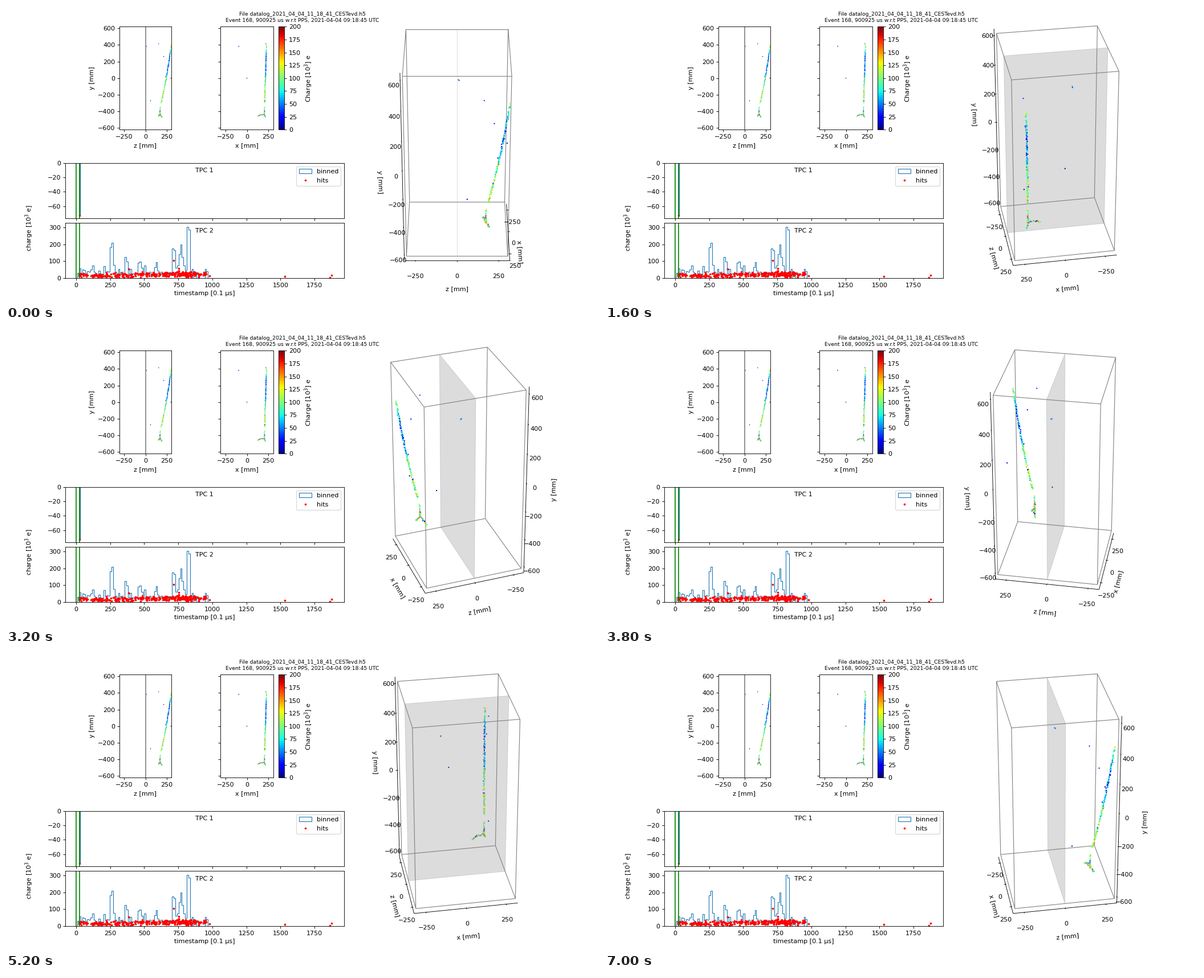
Write a matplotlib script that moves like this. It is 1040 px wide and 520 px high and loops after 7200 ms.

```python
import itertools
import math

import matplotlib.pyplot as plt
import numpy as np
from matplotlib.animation import FuncAnimation
from matplotlib.cm import ScalarMappable
from matplotlib.collections import LineCollection
from matplotlib.colors import Normalize
from matplotlib.patches import Polygon

WIDTH, HEIGHT, DPI = 1040, 520, 80
FRAMES, INTERVAL = 36, 200
rng = np.random.default_rng(168)

# Detector limits in plotting order: x, z (drift), y (vertical)
LIMITS = np.array([310, 304, 620])
TICKS = [range(-250, 251, 250), range(-250, 251, 250), range(-600, 601, 200)]
TITLES = ["x [mm]", "z [mm]", "y [mm]"]

# Camera: the 3D view fills a square between 5 % and 90 % of the height
HALF = np.array([1, 1, 2]) * 1.8294640721620434 / math.sqrt(6) / 2
ELEV, DIST = math.radians(30), 10
SCALE = 0.85 * HEIGHT / 0.185
CENTER_X, CENTER_Y = 791.1, 0.9 * HEIGHT - 0.095 * SCALE

# Axis decoration, in units of the half box
EDGE = 25 / 24
POINT = 0.01004
LABEL_RADIUS = EDGE + 11.5 * POINT
TITLE_RADIUS = [EDGE + pad * POINT for pad in (25, 25, 41)]
CROSS = (1, 0, 0)  # direction of the tick marks on each axis

fig = plt.figure(figsize=(WIDTH / DPI, HEIGHT / DPI), dpi=DPI, facecolor="white")


def add_axes(left, top, width, height):
    return fig.add_axes([left / WIDTH, 1 - (top + height) / HEIGHT,
                         width / WIDTH, height / HEIGHT])


def label_at(x, y, text, **style):
    fig.text(x / WIDTH, 1 - y / HEIGHT, text, ha="center", va="center", **style)


# ---------------------------------------------------------------- data
def strand(count, curve, jitter=2.2):
    """Hits scattered around a curve t -> (x, z, y) with t from 0 to 1."""
    t = np.sort(rng.random(count))
    points = np.column_stack([np.broadcast_to(c, t.shape) for c in curve(t)])
    return points + rng.normal(0, jitter, points.shape)


def track_curve(t):
    y = 400 - 695 * t
    return 217 + 0.03 * y, 243 + 0.175 * y - 6.7e-5 * y ** 2, y


def make_hits():
    strands = [
        strand(230, track_curve),
        strand(28, lambda t: (204, 172, -345 - 95 * t)),
        strand(20, lambda t: (204 + 12 * t, 172 + 22 * t, -440 - 27 * t)),
        strand(26, lambda t: (203 - 88 * t, 172 - 19 * t, -438 - 32 * t ** 3)),
    ]
    strays = [(-97, 8, 385), (-97, 12, 381), (222, 155, 414), (222, 214, 261),
              (215, 238, 22), (210, 60, -272), (0, 299, 0)]
    points = np.vstack(strands)
    y = points[:, 2]
    mean = 100 - 57 * np.exp(-((y - 175) / 150) ** 4)
    value = rng.normal(mean, np.where(y < -340, 40, 25))
    points = np.vstack([points, strays])
    points[:, 1] = np.minimum(points[:, 1], 303)
    return points, np.r_[np.clip(value, 12, 190), np.linspace(50, 8, len(strays))]


hits, charge = make_hits()
jet = dict(cmap="jet", norm=Normalize(0, 200))

# ---------------------------------------------------------------- projections
fig.suptitle("File datalog_2021_04_04_11_18_41_CESTevd.h5\n"
             "Event 168, 900925 us w.r.t PPS, 2021-04-04 09:18:45 UTC",
             fontsize="small")

SIDE_TOP, SIDE_HEIGHT = 36.2, 181.2


def draw_side(left, width, column):
    ax = add_axes(left, SIDE_TOP, width, SIDE_HEIGHT)
    ax.scatter(hits[:, column], hits[:, 2], s=1.9, c=charge, linewidths=0, **jet)
    ax.set(xlim=(-LIMITS[column], LIMITS[column]), ylim=(-LIMITS[2], LIMITS[2]),
           xticks=TICKS[column], yticks=TICKS[2], xlabel=TITLES[column])
    return ax


zy = draw_side(199, 91, 1)
zy.axvline(0, color="gray")
zy.set_ylabel(TITLES[2])
draw_side(376, 93, 0).tick_params(labelleft=False)
fig.colorbar(ScalarMappable(**jet), cax=add_axes(478, SIDE_TOP, 10, SIDE_HEIGHT),
             ticks=range(0, 201, 25), label="Charge [$10^3$] e")


# ---------------------------------------------------------------- charge over time
def draw_tpc(top, name, ylim, yticks, bins, weights, times, values):
    ax = add_axes(104, top, 489, 97)
    ax.hist((bins[:-1] + bins[1:]) / 2, bins, weights=weights, histtype="step",
            color="tab:blue", lw=1, label="binned")
    ax.plot(times, values, "r.", ms=4.5, label="hits")
    for t in (0, 27):
        ax.axvline(t, color="g")
    ax.set(xlim=(-79.5, 1967), ylim=ylim, xticks=range(0, 1751, 250), yticks=yticks)
    label_at(348, top + 13.5, name)
    return ax


def make_waveform():
    bins = np.arange(8, 969, 12.0)
    t = (bins[:-1] + bins[1:]) / 2
    weights = 20 + rng.gamma(1.5, 15, t.size)
    weights[t > 855] *= rng.integers(0, 2, np.sum(t > 855))
    weights += 90 * np.exp(-((t - 770) / 30) ** 2)
    peaks = [(262, 210), (365, 125), (465, 100), (590, 95), (715, 180),
             (768, 200), (823, 310)]
    for center, height in peaks:
        weights = np.maximum(weights, height * np.exp(-((t - center) / 13) ** 4))

    times = np.r_[rng.uniform(10, 960, 260), rng.normal(790, 40, 60)]
    values = np.clip(rng.normal(17, 7, times.size) + 6 * (times > 420), 4, 46)
    outliers = np.array([(385, 54), (715, 105), (755, 58), (978, 15),
                         (1530, 10), (1862, 5), (1874, 17)])
    return (bins, weights, np.r_[times, outliers[:, 0]],
            np.r_[values, outliers[:, 1]])


tpc1 = draw_tpc(276, "TPC 1", (-77, 0), range(-60, 1, 20),
                np.array([25.5, 29.0]), [-73], [27], [-73])
tpc1.legend(loc="upper right")
tpc2 = draw_tpc(381.2, "TPC 2", (0, 326), range(0, 301, 100), *make_waveform())
tpc2.set_xlabel("timestamp [0.1 \u03bcs]")
label_at(41, 390, "charge [$10^3$ e]", rotation=90)

# ---------------------------------------------------------------- rotating view
stage = fig.add_axes([0, 0, 1, 1])
stage.set(xlim=(0, WIDTH), ylim=(HEIGHT, 0))
stage.axis("off")

CORNERS = list(itertools.product((-1, 1), repeat=3))
BOX_EDGES = np.array([(a, b) for a, b in itertools.combinations(CORNERS, 2)
                      if sum(p != q for p, q in zip(a, b)) == 1])
CATHODE = np.array([(-1, 0, -1), (1, 0, -1), (1, 0, 1), (-1, 0, 1)])
SHEET = (0.5, 0.5, 0.5, 0.27)

box_lines = stage.add_collection(LineCollection([], colors="gray", lw=1, zorder=1))
axis_lines = stage.add_collection(LineCollection([], colors="black", lw=0.8, zorder=1.5))
cathode = stage.add_patch(Polygon(np.zeros((4, 2)), facecolor=SHEET,
                                  edgecolor=SHEET, lw=0.9))
cloud = stage.scatter(hits[:, 0], hits[:, 1], s=4.2, c=charge, linewidths=0,
                      zorder=3, **jet)
tick_labels = [[stage.text(0, 0, str(v).replace("-", "\u2212"), ha="center", va="top")
                for v in ticks] for ticks in TICKS]
axis_titles = [stage.text(0, 0, title, ha="center", va="center",
                          rotation_mode="anchor") for title in TITLES]


def project(points, azim):
    """Screen positions and depths of points given in half-box units."""
    x, z, y = np.moveaxis(np.asarray(points, float) * HALF, -1, 0)
    right = z * math.cos(azim) - x * math.sin(azim)
    toward = x * math.cos(azim) + z * math.sin(azim)
    up = y * math.cos(ELEV) - toward * math.sin(ELEV)
    depth = DIST - toward * math.cos(ELEV) - y * math.sin(ELEV)
    screen = np.stack([CENTER_X + SCALE * right / depth,
                       CENTER_Y - SCALE * up / depth], axis=-1)
    return screen, depth


def place_axis(i, near, azim):
    """Move the labels of one axis and return its line and tick marks."""
    side = -near
    side[CROSS[i]] = near[CROSS[i]]

    def at(value, radius, cross_radius=None):
        point = side * radius
        if cross_radius is not None:
            point[CROSS[i]] = side[CROSS[i]] * cross_radius
        point[i] = value
        return project(point, azim)[0]

    start, end = at(-near[i] * EDGE, EDGE), at(near[i] * EDGE, EDGE)
    segments = [(start, end)]
    for value, label in zip(TICKS[i], tick_labels[i]):
        v = value / LIMITS[i]
        segments.append((at(v, EDGE, EDGE - 0.1 / 6), at(v, EDGE, EDGE + 0.2 / 6)))
        label.set_position(at(v, LABEL_RADIUS))

    dx, dy = end - start
    angle = math.degrees(math.atan2(-dy, dx)) % 180
    axis_titles[i].set_position(at(0, TITLE_RADIUS[i]))
    axis_titles[i].set_rotation(angle - 180 if angle > 90 else angle)
    return segments


def update(frame):
    azim = math.radians(frame * 360 / FRAMES)
    near = np.array([1.0 if math.cos(azim) > -1e-9 else -1.0,
                     1.0 if math.sin(azim) > -1e-9 else -1.0, 1.0])
    box_lines.set_segments(project(BOX_EDGES, azim)[0])
    axis_lines.set_segments([s for i in range(3) for s in place_axis(i, near, azim)])

    plane, plane_depth = project(CATHODE, azim)
    spots, depth = project(hits / LIMITS, azim)
    cathode.set_xy(plane)
    # The sheet covers the hits whenever its nearest corner is closer
    cathode.set_zorder(4 if plane_depth.min() < depth.min() else 2)
    order = np.argsort(-depth)
    cloud.set_offsets(spots[order])
    cloud.set_array(charge[order])
    return []


anim = FuncAnimation(fig, update, frames=FRAMES, interval=INTERVAL,
                     init_func=lambda: update(0), repeat=True, blit=False)
plt.show()
```
